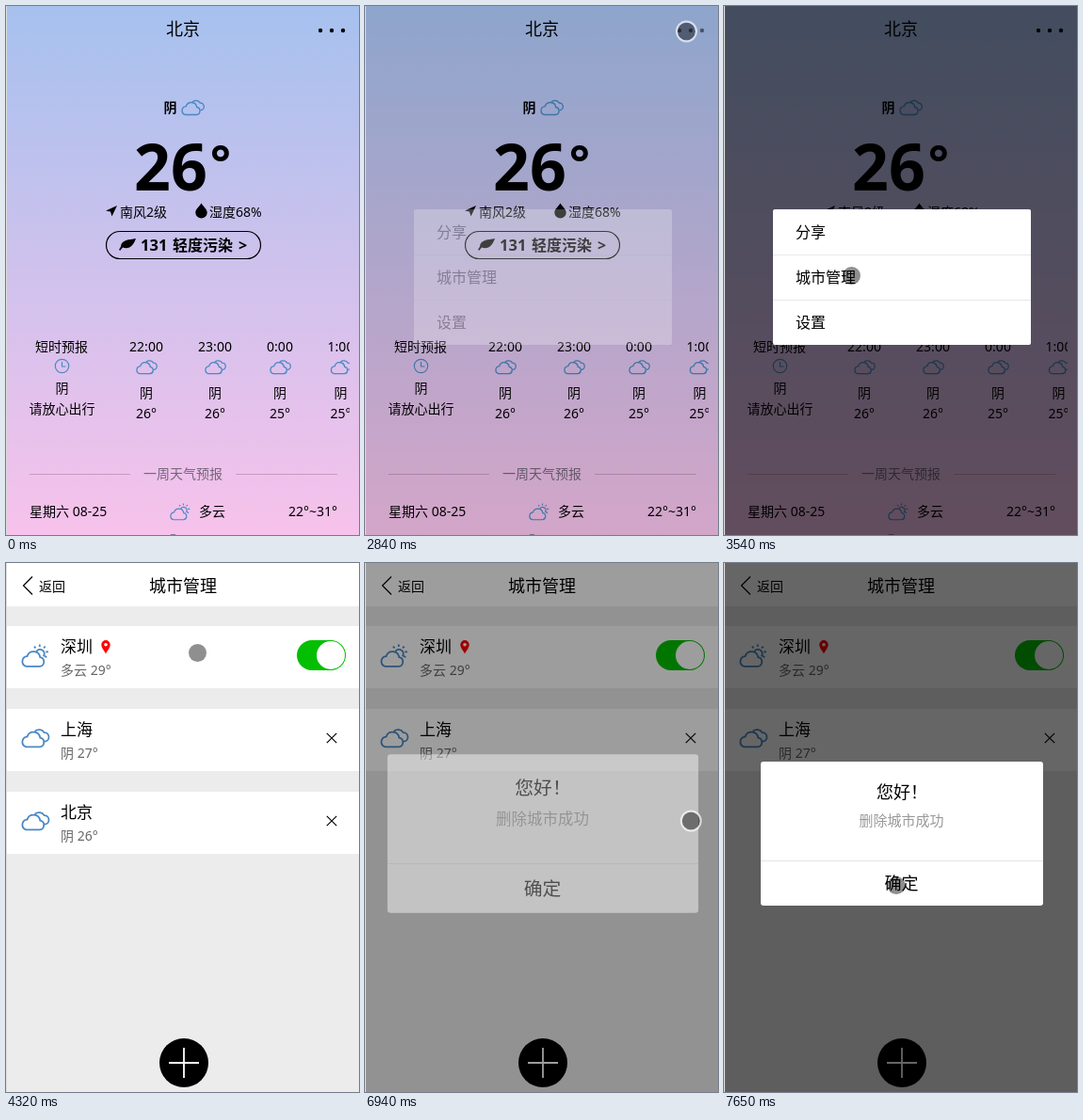
These frames come from a looping animation (375x562 px, 8000 ms). An HTML page with a canvas:

```html
<!DOCTYPE html>
<html lang="zh-CN">
<head>
<meta charset="utf-8">
<style>
html, body { margin: 0; width: 100%; height: 100%; overflow: hidden; }
canvas { display: block; }
</style>
</head>
<body>
<canvas id="stage" width="375" height="562"></canvas>
<script>
const LOOP = 8000;
const FONT = '"Noto Sans", "Noto Sans CJK SC", sans-serif';
const BLUE = '#4a88c4';
const stage = document.getElementById('stage').getContext('2d');
const layer = new OffscreenCanvas(375, 562).getContext('2d');
let c = stage;

const CLOUD = new Path2D('M6 19.5H20.5A4.9 4.9 0 0 0 21 9.8A7.2 7.2 0 0 0 7 8.7A5.5 5.5 0 0 0 6 19.5Z');
const REAR = new Path2D('M15.3 2.8A6.2 5.4 0 0 1 25.3 4.2A4.8 4.8 0 0 1 25.7 13.8');
const SUN = new Path2D('M17 3.5A4.6 4.6 0 1 1 24.5 8.8M20.5-4V-1.5M14.5-2L16.2-.2M26.5-2L24.8-.2M27 4H29.8M26 8.2L28 10');
const ARROW = new Path2D('M118 212L106 217.5L111 218.5L112.5 223.5Z');
const DROP = new Path2D('M207.5 209.5C210 213.5 213.7 216 213.7 219.5A6.2 6 0 0 1 201.3 219.5C201.3 216 205 213.5 207.5 209.5Z');
const LEAF = new Path2D('M138 247C131 248.5 122.5 248 122 255.5L120 259L121.3 259.7L124 256.6C131.5 259 135.5 254 138 247Z');
const PIN = new Path2D('M106 96.5C104 92.5 101.3 90 101.3 86.7A4.7 4.7 0 0 1 110.7 86.7C110.7 90 108 92.5 106 96.5ZM106 85A1.8 1.8 0 1 0 106 88.6A1.8 1.8 0 1 0 106 85Z');

// Pointer stops: time, x, y
const STOPS = [
  [1460, 385, 150], [1880, 333, 31], [2070, 341.5, 27],
  [2900, 341.5, 27], [3520, 135.5, 286.5],
  [4060, 135.5, 286.5], [4320, 203.5, 95.5], [4400, 205, 94], [4710, 209.5, 142.5],
  [5530, 343.5, 272.5], [5590, 343.5, 272.5], [5760, 346.3, 274],
  [7000, 346.3, 274], [7640, 183, 342.5]
];
const CLICKS = [2780, 3910, 6850];

const clamp = v => Math.max(0, Math.min(1, v));
const progress = (t, start, span) => clamp((t - start) / span);
const smooth = p => p * p * (3 - 2 * p);
const isPressed = t => CLICKS.some(start => t >= start && t < start + 130);

// y is the middle of the line
function text(s, x, y, size = 14, color = '#000', align = 'left', weight = 400) {
  c.font = `${weight} ${size}px ${FONT}`;
  c.textAlign = align;
  c.fillStyle = color;
  c.fillText(s, x, y + size * 0.37);
}
const centered = (s, x, y, size, color) => text(s, x, y, size, color, 'center');
const bold = (s, x, y, size) => text(s, x, y, size, '#000', 'left', 700);

function rect(x, y, w, h, color) {
  c.fillStyle = color;
  c.fillRect(x, y, w, h);
}

function rounded(x, y, w, h, r, color) {
  c.beginPath();
  c.roundRect(x, y, w, h, r);
  c.fillStyle = color;
  c.fill();
}

function disc(x, y, r, color) {
  c.beginPath();
  c.arc(x, y, r, 0, 7);
  c.fillStyle = color;
  c.fill();
}

function ring(x, y, r, color, width) {
  c.beginPath();
  c.arc(x, y, r, 0, 7);
  c.strokeStyle = color;
  c.lineWidth = width;
  c.stroke();
}

function lines(d, color = '#000', width = 1.2) {
  c.strokeStyle = color;
  c.lineWidth = width;
  c.stroke(new Path2D(d));
}

function weatherIcon(x, y, scale, back, width) {
  c.save();
  c.translate(x, y);
  c.scale(scale, scale);
  c.strokeStyle = BLUE;
  c.lineWidth = width / scale;
  c.stroke(CLOUD);
  c.stroke(back);
  c.restore();
}

function weatherPage(pressed) {
  const sky = c.createLinearGradient(0, 0, 0, 590);
  sky.addColorStop(0, '#a6c1ee');
  sky.addColorStop(1, '#fbc2eb');
  rect(0, 0, 375, 562, sky);
  centered('北京', 188, 24, 18);
  for (const x of [334, 346, 358]) disc(x, 26, 2.2, pressed ? 'rgba(0,0,0,.5)' : '#000');

  bold('阴', 167.5, 108, 14);
  weatherIcon(185.5, 99.5, 0.82, REAR, 1.4);
  bold('26', 136, 171, 68);
  bold('°', 217, 165, 51);
  c.fillStyle = '#000';
  for (const shape of [ARROW, DROP, LEAF]) c.fill(shape);
  text('南风2级', 121, 219);
  text('湿度68%', 216, 219);
  c.beginPath();
  c.roundRect(106.5, 239.5, 164, 29, 14.5);
  c.strokeStyle = '#000';
  c.lineWidth = 1.2;
  c.stroke();
  bold('131', 143, 254, 16.5);
  bold('轻度污染', 177, 254, 16);
  bold('>', 247, 254, 16);

  centered('短时预报', 59, 362);
  ring(59.5, 382.5, 7.2, BLUE, 1.2);
  lines('M59.5 378V383H63.5', BLUE);
  centered('阴', 59.5, 406);
  centered('请放心出行', 59.5, 428);
  c.save();
  c.beginPath();
  c.rect(25, 340, 340, 110);
  c.clip();
  [['22:00', 149, 26], ['23:00', 222, 26], ['0:00', 291, 25], ['1:00', 355.5, 25]].forEach(([hour, x, degrees]) => {
    centered(hour, x, 362);
    weatherIcon(x - 11.5, 376, 0.75, REAR, 1.3);
    centered('阴', x, 411);
    centered(degrees + '°', x, 433);
  });
  c.restore();

  rect(25, 497, 107, 1, 'rgba(150,90,120,.4)');
  rect(244, 497, 108, 1, 'rgba(150,90,120,.4)');
  centered('一周天气预报', 188, 497, 14, '#75667a');
  text('星期六 08-25', 25, 537);
  weatherIcon(173.5, 531.5, 0.73, SUN, 1.2);
  text('多云', 205, 537);
  text('22°~31°', 352, 537, 14, '#000', 'right');
  rect(175, 561, 5, 1, 'rgba(60,80,110,.6)');
}

function cityPage(withThird) {
  rect(0, 0, 375, 562, '#ececec');
  rect(0, 0, 375, 46, '#fff');
  lines('M28 14.5L18.5 24L28 33.5');
  text('返回', 35, 25);
  centered('城市管理', 188, 24, 18);

  const cities = [['深圳', '多云 29°', SUN], ['上海', '阴 27°', REAR], ['北京', '阴 26°', REAR]];
  cities.slice(0, withThird ? 3 : 2).forEach(([name, weather, back], i) => {
    const y = 67 + 88 * i;
    rect(0, y, 375, 66, '#fff');
    weatherIcon(15.5, y + (i ? 21 : 23.5), 0.99, back, 1.8);
    text(name, 58, y + 22, 17);
    text(weather, 58, y + 47, 14, '#666');
    if (i) lines(`M340.8 ${y + 25.8}l10.4 10.4m0 -10.4l-10.4 10.4`);
  });
  c.fillStyle = '#f00';
  c.fill(PIN, 'evenodd');
  rounded(309, 82, 52, 32, 16, '#04be02');
  disc(345, 98, 15, '#fff');

  disc(189, 531, 26, '#000');
  lines('M173 531H205M189 515V547', '#fff', 1.8);
}

// Paints on a separate layer so that the parts fade as one
function fadeGroup(alpha, paint) {
  c = layer;
  c.clearRect(0, 0, 375, 562);
  c.save();
  paint();
  c.restore();
  c = stage;
  c.globalAlpha = alpha;
  c.drawImage(layer.canvas, 0, 0);
  c.globalAlpha = 1;
}

function shade(p) {
  rect(0, 0, 375, 562, `rgba(0,0,0,${0.6 * p})`);
}

function menu(p) {
  if (!p) return;
  shade(p);
  fadeGroup(p, () => {
    rounded(52, 216, 274, 144, 2, '#fff');
    ['分享', '城市管理', '设置'].forEach((label, i) => {
      if (i) rect(52, 216 + 48 * i, 274, 1, '#e8e8e8');
      text(label, 76, 240.5 + 48 * i, 16);
    });
  });
}

function dialog(p) {
  if (!p) return;
  shade(1 - (1 - p) ** 1.7);
  fadeGroup(p, () => {
    const scale = 1 + 0.185 * (1 - p);
    c.translate(189, 287.5);
    c.scale(scale, scale);
    c.translate(-189, -287.5);
    rounded(39, 211, 300, 153, 3, '#fff');
    centered('您好！', 189, 243, 18);
    centered('删除城市成功', 188.5, 273, 15, '#999');
    rect(39, 316, 300, 1, '#e5e5e5');
    centered('确定', 188.5, 340, 18);
  });
}

function pointer(t) {
  if (t < STOPS[0][0]) return;
  let [, x, y] = STOPS[0];
  for (let i = 1; i < STOPS.length; i++) {
    const [from, to] = [STOPS[i - 1], STOPS[i]];
    if (t < from[0]) break;
    const p = smooth(progress(t, from[0], to[0] - from[0]));
    x = from[1] + (to[1] - from[1]) * p;
    y = from[2] + (to[2] - from[2]) * p;
  }
  disc(x, y, 9.5, 'rgba(0,0,0,.44)');
  if (isPressed(t)) ring(x, y, 10.5, 'rgba(255,255,255,.65)', 2);
}

function draw(t) {
  if (t < 4030) {
    weatherPage(isPressed(t) && t < 3000);
    menu(Math.min(progress(t, 2780, 250), 1 - progress(t, 3940, 120)));
  } else {
    cityPage(t < 6850);
    dialog(progress(t, 6850, 200));
  }
  rect(0, 0, 1, 562, '#dcdcdc');
  pointer(t);
}

function tick() {
  draw(performance.now() % LOOP);
  requestAnimationFrame(tick);
}
tick();
</script>
</body>
</html>
```
